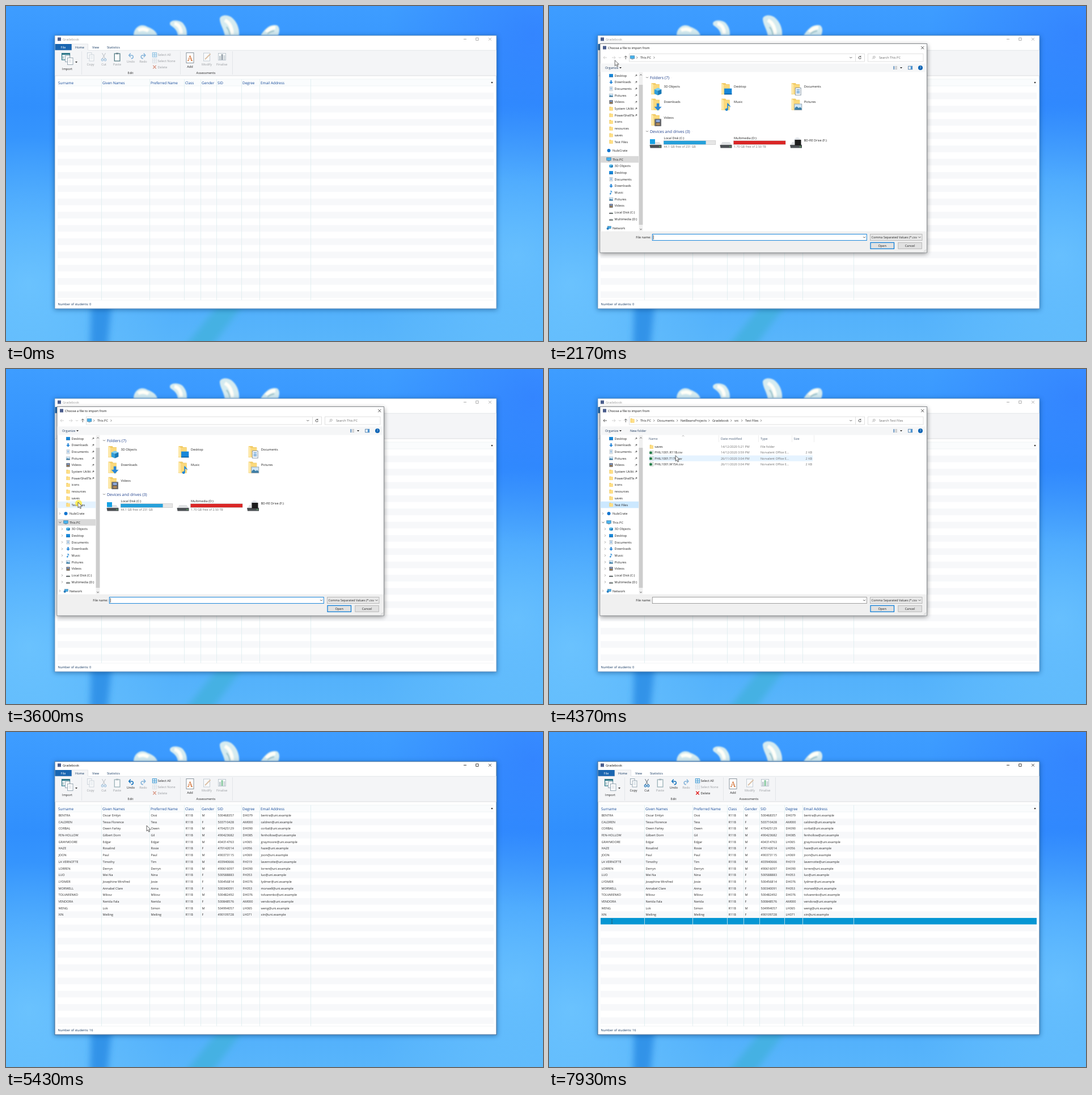
Recreate the animation shown at these times as an HTML page. Size 947 by 591 pixels, loop 7.99 s.

```html
<!DOCTYPE html>
<html lang="en">
<head>
<meta charset="utf-8">
<title>Gradebook import</title>
<style>
html,body{margin:0;width:100%;height:100%;overflow:hidden;background:#3b9bff}
svg{display:block;width:100vw;height:100vh}
text{font-family:"Open Sans","Noto Sans",sans-serif;text-rendering:geometricPrecision;white-space:pre}
</style>
</head>
<body>
<script>
const END = 7990, OPEN = 2090, FILES = 3740, CLOSE = 4730, FILL = 4775, SELECT = 7330;

// drawing helpers
const T = (x, y, s, c = '#222', z = 5.6, a = 'start') =>
  `<text x="${x}" y="${y + z * .36}" font-size="${z}" fill="${c}" text-anchor="${a}">${s}</text>`;
const R = (x, y, w, h, f, s = 'none', sw = .8) =>
  `<rect x="${x}" y="${y}" width="${w}" height="${h}" fill="${f}" stroke="${s}" stroke-width="${sw}"/>`;
const P = (d, s, w = .8, f = 'none') => `<path d="${d}" stroke="${s}" stroke-width="${w}" fill="${f}"/>`;
const F = (d, f) => `<path d="${d}" fill="${f}"/>`;
const C = (x, y, r, f) => `<circle cx="${x}" cy="${y}" r="${r}" fill="${f}"/>`;
const at = (x, y, s, k = 1) => `<g transform="translate(${x} ${y}) scale(${k})">${s}</g>`;
const fade = (o, s) => `<g opacity="${o}">${s}</g>`;
// content shown between two times
const G = (a, b, s) => `<g data-on="${a},${b}">${s}</g>`;
// a control that changes state once
const flip = (t, f) => G(0, t, f(false)) + G(t, END, f(true));
const right = (x, y, c = '#555') => P(`M${x - 1} ${y - 1.8}l1.8 1.8l-1.8 1.8`, c, .7);
const down = (x, y, c = '#444') => P(`M${x - 2} ${y - 1}l2 2l2 -2`, c, .8);
const drop = (x, y) => F(`M${x - 2} ${y - 1}h4l-2 2.2z`, '#222');

// icons on an 8 x 8 grid
const icon = {
  folder: F('M.6 .3h3l.8 1h3v6.4H.6z', '#f0c85a') + F('M1.6 1.3h5.8v6.4H1.6z', '#ffdf87'),
  desk: R(.2, 1, 7.6, 6, '#1787d9') + R(.2, 6.2, 7.6, .9, '#0b5d9e'),
  arrow: F('M2.7 .3h2.6v3.4h2.4L4 7.8L.3 3.7h2.4z', '#2a88d8'),
  doc: R(1.2, .4, 5.6, 7.2, '#fff', '#8a99a8', .6) + P('M2.3 2.2h3.4M2.3 3.8h3.4M2.3 5.4h3.4', '#4d8fcb', .8),
  pic: R(.3, 1, 7.4, 6, '#cfe6f7', '#8c9aa5', .5) + F('M.6 6.8V5l2-1.6 2 1.6 1.3-.8 1.6 1v1.6z', '#3d7ea6'),
  film: R(.7, .4, 6.6, 7.2, '#3c3f45') + R(2, 1, 4, 2.7, '#8ba6d8') + R(2, 4.3, 4, 2.7, '#a98659') +
    P('M1.3 .8v6.6M6.7 .8v6.6', '#ddd', .5).replace('/>', ' stroke-dasharray=".7 .7"/>'),
  cube: F('M4 .3l3.6 1.5L4 3.2L.4 1.8z', '#7fd0f5') + F('M.4 1.8L4 3.2v4.6L.4 6.2z', '#2f9fdc') + F('M7.6 1.8L4 3.2v4.6l3.6-1.6z', '#1878b5'),
  note: F('M3.2 .2h.9c.3 1.7 2.6 1.8 2.2 4.2c-.3-1.1-1.2-1.6-2.2-1.8v3.5c0 2.3-3 2.2-3 .5c0-1.1 1.2-1.5 2.1-1.2z', '#1d86d6'),
  drive: F('M1.5 3h5l1.3 2H.2z', '#d9dbdd') + R(.2, 5, 7.6, 1.9, '#55595d') + R(6.3, 5.6, .8, .7, '#62e066'),
  cloud: C(4, 4, 3, '#1274cf'),
  pc: R(.2, .8, 7.6, 5, '#46b3ee', '#3a6e92', .6) + R(2.2, 6.5, 3.6, .8, '#6f8799'),
  net: R(1.8, 1, 6, 4, '#48aee6', '#3a6e92', .5) + C(2.2, 5.2, 2.1, '#2a7fc0'),
  sheet: R(1.6, .4, 6, 7.2, '#fff', '#8d9a90', .5) + R(0, 2, 5, 4.6, '#1e7a45') + P('M5.5 2.6h1.5M5.5 4.2h1.5M5.5 5.8h1.5', '#7aa888', .6)
};
const I = (n, x, y, k = 1) => at(x - 4 * k, y - 4 * k, icon[n], k);

function wallpaper() {
  const petals = 'M225 52C225 38 238 29 250 37C258 40 265 44 267 52Z M290 34C284 24 308 22 314 33C319 40 319 46 319 52H303C302 42 297 39 290 34Z' +
    'M377 24C376 15 392 14 399 21C409 30 412 42 411 53H386C384 40 378 34 377 24Z M449 52C456 41 465 31 478 34C484 38 482 47 480 52Z';
  return R(0, 0, 947, 591, 'url(#sky)') + R(0, 0, 947, 591, 'url(#lo)') + R(0, 0, 947, 591, 'url(#ro)') + R(0, 0, 947, 591, 'url(#hi)') +
    `<g filter="url(#b6)">${F('M151 500h38L178 610h-30z', '#3193e8')}${F('M392 505h42L356 610h-48z', '#45b1e3')}</g>` +
    `<g filter="url(#b2)">${F(petals, '#d5ebf0')}${P('M233 43q9-5 18 1M297 31q11 2 12 18M386 25q12 6 13 25M459 46q7-8 16-8', '#fffff8', 6)}${P('M389 37q5 6 6 14M461 49q5-4 12-5', '#93bdc4', 2)}</g>`;
}

const people = [
  ['BENTRA', 'Oscar Emlyn', 'Ossi', 'M', '500468357', 'DH079'],
  ['CALDREN', 'Tessa Florence', 'Tess', 'F', '503710428', 'AM000'],
  ['CORBAL', 'Owen Farley', 'Owen', 'M', '470425129', 'DH090'],
  ['FEN-HOLLOW', 'Gilbert Dorn', 'Gil', 'M', '490423682', 'DH085'],
  ['GRAYMOORE', 'Edgar', 'Edgar', 'M', '404314763', 'LH065'],
  ['HAZE', 'Rosalind', 'Rosie', 'F', '470142014', 'LH056'],
  ['JOON', 'Paul', 'Paul', 'M', '490373115', 'LH069'],
  ['LA VERNOTTE', 'Timothy', 'Tim', 'M', '403940666', 'FH019'],
  ['LORREN', 'Derryn', 'Derryn', 'M', '490616097', 'DH090'],
  ['LUO', 'Mei Na', 'Nina', 'F', '500588883', 'FH053'],
  ['LYDMER', 'Josephine Winifred', 'Josie', 'F', '500456814', 'DH076'],
  ['MORWELL', 'Annabel Clare', 'Anna', 'F', '500340091', 'FH053'],
  ['TOLVARENKO', 'Milosz', 'Milosz', 'M', '500482492', 'DH076'],
  ['VENDORA', 'Nerida Fala', 'Nerida', 'F', '500848576', 'AM000'],
  ['WENG', 'Lok', 'Simon', 'M', '504994057', 'LH065'],
  ['XIN', 'Meiling', 'Meiling', 'F', '490109728', 'LH071']
];
const cols = [92, 170, 255, 316, 345, 373, 417, 449];
const ROW = 11.69, rowY = i => 141 + ROW * i;

function ribbon() {
  const ink = '#222', dim = '#9a9da1';
  const label = (x, y, s, on) => T(x, y, s, on ? ink : dim, 5.6, 'middle');
  const page = (x, y, w, h, s = '#8194a3') => R(x, y, w, h, '#fff', s, .8);
  const copy = page(143.5, 82.5, 7.5, 10) + page(147, 86, 8, 11) + P('M149 89h4M149 91h4M149 93h4', '#9eb5c7', .6);
  const cut = P('M169.5 83L175 93M175.5 83L170 93', '#5b6670', 1) +
    '<g fill="none" stroke="#1b72b8" stroke-width="1.2"><circle cx="170" cy="95" r="1.8"/><circle cx="175" cy="95" r="1.8"/></g>';
  const paste = R(191.3, 84, 9.6, 13, '#fff', '#426f79', 1.3) + R(194, 82.6, 4.2, 2.6, '#587781');
  const undo = P('M218 87h3.6c4 0 3.6 6-.9 5.6M219.7 83.6L216.7 87l3 3.2', '#1673bd', 1.5);
  const grid = c => R(258.3, 82.5, 7.4, 7.4, '#e4f2fb', c) + P('M258 86.2h8M262 82v8', c, .8);
  const cross = c => P('M259.3 104.8l5.4 5.6M264.7 104.8l-5.4 5.6', c, 1.4);
  return R(86.5, 78, 778, 45, '#f4f5f7') + P('M86 78.2H116M145 78.2H865', '#dcdfe2', .7) + P('M86 123H865', '#d3d6d9', .8) +
    P('M133.5 80v41M307.5 80v41M399.5 80v41', '#dfe2e5', .8) +
    G(830, OPEN, R(92.5, 80.5, 37, 38, '#d5e6f7', '#a5c8ea')) +
    R(98.5, 83.5, 14, 11.5, '#e9f4f5', '#2a7586', 1.2) + R(98.5, 83, 14, 3, '#2a7586') + T(100, 90.5, 'I', '#234', 6) +
    page(104.5, 87.5, 8, 11) + page(108.5, 91.5, 9.5, 12) + P('M110.5 95h5M110.5 97h5M110.5 99h5', '#b5c2cb', .6) + drop(124, 99) +
    label(108, 111, 'Import', 1) +
    flip(SELECT, on => fade(on ? 1 : .4, copy + cut) + label(149, 103, 'Copy', on) + label(172.6, 102.5, 'Cut', on) +
      fade(on ? 1 : .55, cross(on ? '#e01b1b' : '#c4502e')) + T(267.5, 107.5, 'Delete', on ? ink : dim)) +
    flip(FILL, on => fade(on ? .5 : .9, paste) + fade(on ? 1 : .5, undo) + label(220, 98, 'Undo', on) +
      fade(on ? 1 : .6, grid('#2288c8')) + T(267.5, 86, 'Select All', on ? ink : dim)) +
    label(196, 102.5, 'Paste') + fade(.5, `<g transform="translate(462.5 0) scale(-1 1)">${undo}</g>`) + label(242, 98, 'Redo') +
    fade(.25, at(0, 10.6, grid('#8495a0'))) + T(267.5, 97, 'Select None', dim) +
    page(318, 82.5, 13, 18, '#6e7b85') +
    '<text x="324.5" y="96.6" font-size="13.5" fill="#d06a2c" text-anchor="middle" style="font-family:\'Noto Serif\',serif">A</text>' + label(324.5, 106.5, 'Add', 1) +
    fade(.5, page(348.5, 83, 11, 14) + P('M351 94l9.5-9.5', '#c28a55', 1.8)) + label(354, 102.5, 'Modify') +
    flip(FILL, on => fade(.6, page(374.5, 83.5, 13, 12) + R(376, 88, 2.5, 7, '#9aa9b3') + R(379.6, 85, 3, 10, on ? '#43ad68' : '#5d6f7c') + R(383.8, 87, 2.5, 8, '#b1bdc5'))) +
    label(380.7, 102.5, 'Finalise') + label(219.5, 118, 'Edit', 1) + label(352.5, 118, 'Assessments', 1);
}

function table() {
  let s = R(91, 129, 769, 12, '#fafcfd') + P('M91 141H860M91 129H860', '#e9eff3', .7);
  for (let i = 1; rowY(i) < 515; i += 2) s += R(91, rowY(i), 769, ROW, '#f7f8fa');
  s += G(SELECT, END, R(91, rowY(16), 769, 11.4, '#0596d3'));
  s += P([168.5, 253.5, 314.5, 343.5, 371.5, 415.5, 447.5, 537.5].map(x => `M${x} 129V519`).join(''), '#dcecef', .8) + P('M91 519H860', '#eef0f2', .7);
  ['Surname', 'Given Names', 'Preferred Name', 'Class', 'Gender', 'SID', 'Degree', 'Email Address']
    .forEach((h, i) => s += T(cols[i], 135.3, h, '#0f4596', 6.4));
  const rows = people.map(([sur, given, pref, sex, sid, deg], i) =>
    [sur, given, pref, 'R11B', sex, sid, deg, sur.toLowerCase().replace(/[^a-z]/g, '') + '@uni.example']
      .map((v, k) => T(cols[k] + .5, 147 + ROW * i, v, '#2a2a2a', 5.5)).join('')).join('');
  return s + G(FILL, END, rows) + C(857, 135, 1.3, '#333') +
    flip(FILL, on => T(91.5, 525.7, 'Number of students: ' + (on ? 16 : 0), '#173a63'));
}

function mainWindow() {
  const bar = c => T(100, 59, 'Gradebook', c) + P('M807 58.5h5M828.7 56.2h4.4v4.4h-4.4zM851.2 56.2l4.6 4.6M855.8 56.2l-4.6 4.6', c, .8);
  const dim = bar('#999'), lit = bar('#111') + R(86, 52, 779, 482, 'none', '#44719c', .8);
  return `<g filter="url(#b4)" opacity=".5">${R(85, 53, 781, 483, '#0a3a70')}</g>` +
    R(86, 52, 779, 482, '#fff', '#5f8db8') + R(91, 55.5, 6, 6, '#4a5d8c') +
    G(0, 1810, dim) + G(1810, 1950, lit) + G(1950, CLOSE, dim) + G(CLOSE, END, lit) +
    R(86.5, 67, 29.5, 11.4, '#1965b0') + T(101, 72.7, 'File', '#fff', 5.6, 'middle') + ribbon() +
    F('M116 79V67h29v12z', '#f4f5f7') + P('M116 78V67h28.5v11', '#dcdfe2', .7) +
    T(122, 72.7, 'Home', '#173a63') + T(152, 72.7, 'View', '#173a63') + T(178, 72.7, 'Statistics', '#173a63') + table() +
    G(1350, 1810, R(113.7, 97, 74.6, 13.4, '#2c2d2f') + T(118, 103.7, 'Import students from class roll', '#f2f2f2', 4.7));
}

function sidebar() {
  const quick = [['Desktop', 'desk'], ['Downloads', 'arrow'], ['Documents', 'doc'], ['Pictures', 'pic'], ['Videos', 'film'],
    ['System Utiliti', 'folder'], ['PowerShellTe', 'folder'], ['icons', 'folder'], ['resources', 'folder'], ['saves', 'folder'], ['Test Files', 'folder']];
  const pc = [['3D Objects', 'cube'], ['Desktop', 'desk'], ['Documents', 'doc'], ['Downloads', 'arrow'], ['Music', 'note'],
    ['Pictures', 'pic'], ['Videos', 'film'], ['Local Disk (C:)', 'drive'], ['Multimedia (D:)', 'drive']];
  const roots = [['NubiCrate', 'cloud', 255], ['This PC', 'pc', 270.6], ['Network', 'net', 391.5]];
  let s = G(OPEN, FILES, R(90.5, 264.8, 67.5, 11.6, '#d9d9d9')) + G(FILES, CLOSE, R(90.5, 233.7, 67.5, 11.6, '#cce8ff')), open = '';
  quick.forEach(([n, k], i) => {
    const y = 122.6 + 11.69 * i;
    s += I(k, 109.5, y, .9) + T(115.6, y, n);
    if (i < 7) s += at(153.6, y, P('M-2 2L0 0', '#666', .6) + F('M-1.2-.6L.6-2.2L2.2-.4L.4 1.2z', '#777'));
  });
  pc.forEach(([n, k], i) => {
    const y = 282.2 + 11.7 * i;
    s += I(k, 109.5, y, .9) + T(115.6, y, n);
    open += right(99, y, '#777');
  });
  roots.forEach(([n, k, y], i) => {
    s += I(k, 105.5, y) + T(112, y, n);
    open += i == 1 ? down(95.3, y) : right(95, y, '#777');
  });
  return s + G(2960, CLOSE, open) + R(158.6, 117, 6.8, 280, '#f0f0f0') + R(158.6, 139, 6.8, 247, '#cdcdcd') +
    P('M160.3 122.4l1.7-1.7l1.7 1.7M160.3 393l1.7 1.7l1.7-1.7', '#444', .9);
}

function pcView() {
  const navy = '#1e3f8b';
  let s = down(173, 126, '#777') + T(178, 126.2, 'Folders (7)', navy, 7) + down(173, 221, '#777') + T(178, 221.2, 'Devices and drives (3)', navy, 7) +
    P('M216 126.3H217M252 221.3H253', '#e2e2e2', .6);
  [['3D Objects', 'cube'], ['Desktop', 'desk'], ['Documents', 'doc'], ['Downloads', 'arrow'], ['Music', 'note'], ['Pictures', 'pic'], ['Videos', 'film']]
    .forEach(([n, k], i) => {
      const x = 179.5 + 123.6 * (i % 3), y = 136 + 27.4 * (i / 3 | 0);
      s += F(`M${x + 1} ${y}h7l1.5 2h6v18h-14.5z`, '#f1cb67') + F(`M${x + 1} ${y}l4 3v17.5l-4-2z`, '#ffe9a8') + F(`M${x + 5} ${y + 3}h10.5v17H${x + 5}z`, '#fbd97c') +
        I(k, x + 12.6, y + 14.8, 1.75) + T(x + 23, y + 5.7, n);
    });
  const bar = (x, w, c) => R(x, 237.7, 91.5, 6.6, '#e6e6e6', '#bcbcbc', .6) + R(x, 237.9, w, 6.2, c);
  const disk = x => F(`M${x + 4} 240h13l4 5h-20z`, '#dfe1e3') + F(`M${x} 245h21v5.5h-20z`, '#4c5054') + R(x + 17, 247.4, 2, 1.2, '#57e25c');
  return s + disk(177.5) + R(178, 235, 9, 8.6, '#16a2e4') + T(202.5, 233, 'Local Disk (C:)') + bar(202.3, 74.3, '#26a0da') + T(202.5, 248, '44.1 GB free of 231 GB', '#6d6d6d', 5.35) +
    disk(301.5) + T(326, 233, 'Multimedia (D:)') + bar(325.6, 91.4, '#da2626') + T(326, 248, '1.70 GB free of 2.50 TB', '#6d6d6d', 5.35) +
    C(438, 238, 6, '#dfe3e8') + disk(425) + R(433.5, 236, 11, 10, '#1c1c1c') + T(449.5, 236.7, 'BD-RE Drive (F:)');
}

function fileView() {
  const head = '#4c607a', soft = '#6d6d6d';
  let s = P('M299.5 117v12M369.5 117v12M428.5 117v12M467.5 117v12', '#e5e5e5', .7) + P('M234.8 118.8l1.8-1.5l1.8 1.5', '#777', .6);
  [[176, 'Name'], [303, 'Date modified'], [373, 'Type'], [431.5, 'Size']].forEach(([x, n]) => s += T(x, 123.3, n, head));
  [['saves', '14/12/2020 5:21 PM'], ['PHIL1001.R11B.csv', '14/12/2020 3:59 PM'], ['PHIL1001.T17B.csv', '26/11/2020 3:04 PM'], ['PHIL1001.W15A.csv', '26/11/2020 3:04 PM']]
    .forEach(([n, d], i) => {
      const y = 137.2 + 10.25 * i;
      s += I(i ? 'sheet' : 'folder', 180.8, y, .9) + T(186.3, y, n) + T(303, y, d, soft, 5.45) +
        T(373, y, i ? 'Norvalent Office E...' : 'File folder', soft, 5.45) + (i ? T(464, y, '2 KB', soft, 5.45, 'end') : '');
    });
  return s;
}

function dialog() {
  const crumbs = list => list.map(([x, n]) => right(x - 5.7, 91) + T(x, 91, n)).join('');
  const arrow = (x, d, c) => P(`M${x - 3 * d} 91h${6 * d}M${x - .6 * d} 88.5l${-2.5 * d} 2.5l${2.5 * d} 2.5`, c, .8);
  const search = n => T(582, 91, 'Search ' + n, '#6d6d6d');
  const pc = arrow(99, 1, '#c4c4c4') + I('pc', 147, 91) + crumbs([[161, 'This PC']]) + right(185.5, 91) + search('This PC') + pcView() +
    R(182.3, 402.6, 378, 11, 'none', '#0078d7', .9);
  const files = arrow(99, 1, '#333') + I('folder', 147, 91) +
    crumbs([[161, 'This PC'], [191, 'Documents'], [232, 'NetBeansProjects'], [288, 'Gradebook'], [327, 'src'], [346, 'Test Files']]) + right(374, 91) +
    search('Test Files') + T(143, 109, 'New folder', '#1f3a5f') + fileView() + R(182.3, 402.6, 378, 11, 'none', '#8a8a8a', .8);
  const button = (x, n, c, w) => R(x, 417.3, 41.5, 11, '#e1e1e1', c, w) + T(x + 20.7, 422.7, n, '#222', 5.6, 'middle');
  return `<g filter="url(#b4)" opacity=".45">${R(90, 69, 577, 368, '#000')}</g>` +
    R(90, 66.5, 576.5, 368.5, '#fff', '#6b7075') + R(95, 70.5, 6, 6, '#4a5d8c') + T(104, 74, 'Choose a file to import from', '#111') +
    P('M656.2 71.2l5 5M661.2 71.2l-5 5', '#222', .8) +
    arrow(114, -1, '#c4c4c4') + down(125, 91, '#c0c0c0') + P('M135.3 94v-6M132.8 90.5l2.5-2.5l2.5 2.5', '#444', .8) +
    R(141.5, 84.2, 415, 13.8, '#fff', '#d9d9d9') + P('M540.5 84v14', '#d9d9d9') + down(532.3, 91) +
    P('M549.6 89.4a2.2 2.2 0 1 0 .7 1.8M549.9 87.8v1.9h-1.9', '#333', .8) +
    R(562.3, 84.2, 97.7, 13.8, '#fff', '#d9d9d9') + P('M570 93.5l1.8-1.8M571.5 90.3a1.8 1.8 0 1 1 1.8 1.8a1.8 1.8 0 0 1-1.8-1.8', '#888', .7) +
    R(90.5, 101.5, 575.6, 15, '#f5f6f7') + T(99, 109, 'Organize', '#1f3a5f') + drop(126, 109) +
    P('M607 106.8h2.5M607 109h2.5M607 111.2h2.5', '#4b81b5', 1.3) + P('M610.5 106.8h3.5M610.5 109h3.5M610.5 111.2h3.5', '#888', .7) + drop(621, 109) +
    R(633.7, 106.2, 7, 5.6, '#fff', '#336b9f', .8) + R(637.7, 106.2, 3, 5.6, '#4b93d2') + C(655, 109, 4, '#0a63b5') + T(655, 109.2, '?', '#fff', 6, 'middle') +
    R(90.5, 397.5, 575.6, 37, '#f0f0f0') + R(182.3, 402.6, 378, 11, '#fff') + '<rect id="hover" fill="#e5f3ff"/>' +
    sidebar() + G(OPEN, FILES, pc) + G(FILES, END, files) +
    '<rect id="caret" x="183.8" y="404.3" width=".7" height="7.6" fill="#111"/>' +
    down(556, 408) + T(180, 408, 'File name:', '#222', 5.6, 'end') + R(566.5, 402.6, 91.5, 11, '#e8e8e8', '#adadad') +
    T(568.5, 408, 'Comma Separated Values (*.csv', '#222', 5.45) + down(653.5, 408) +
    button(567, 'Open', '#0078d7', 1.2) + button(615.8, 'Cancel', '#adadad', .8) + P('M661 433.5l4-4M663.4 433.5l1.6-1.6', '#b5b5b5', .7);
}

const glow = (id, x, y, r, c, o) => `<radialGradient id="${id}" gradientUnits="userSpaceOnUse" cx="${x}" cy="${y}" r="${r}"><stop stop-color="${c}" stop-opacity="${o}"/><stop offset="1" stop-color="${c}" stop-opacity="0"/></radialGradient>`;
const blur = n => `<filter id="b${n}" x="-20%" y="-20%" width="140%" height="140%"><feGaussianBlur stdDeviation="${n == 2 ? 1.2 : n}"/></filter>`;
document.body.innerHTML = `<svg viewBox="0 0 947 591" preserveAspectRatio="none"><defs>
<linearGradient id="sky" x2="0" y2="1"><stop stop-color="#3e9dff"/><stop offset=".3" stop-color="#308ffd"/><stop offset=".65" stop-color="#45a5fd"/><stop offset="1" stop-color="#58b5fb"/></linearGradient>
${glow('lo', 40, 490, 260, '#76cbff', .7)}${glow('ro', 900, 440, 270, '#76cbff', .65)}${glow('hi', 930, 50, 260, '#2f78ff', .6)}${[2, 4, 6].map(blur).join('')}</defs>
${wallpaper()}${mainWindow()}<g id="dlg">${dialog()}</g>
<circle id="click" r="6" fill="#ffe92e" opacity=".75"/>
<g id="arrow">${P('M0 0V9.8L2.3 7.7L3.8 11.2L5.5 10.5L4 7.1H7Z', '#222', .7, '#fff')}</g>
<g id="beam">${P('M109.6 330.5h2.8M111 330.5v7M109.6 337.5h2.8', '#27576b', .8)}</g></svg>`;

// pointer stops: time, x, y
const path = [[130, 872, 569], [890, 109, 92.5], [2090, 109, 92.5], [2520, 197, 147], [2880, 172, 212], [3330, 127, 235], [3700, 127, 235],
  [4370, 223, 152.8], [4420, 219, 150], [4510, 215, 147], [4730, 215, 147], [5430, 248, 165], [5700, 271, 158], [5960, 210, 232],
  [6340, 84, 200], [6480, 110, 182], [6740, 238, 205], [7100, 107, 330], [END, 107, 330]];

function pointer(t) {
  let i = 0;
  while (i < path.length - 2 && t >= path[i + 1][0]) i++;
  const a = path[i], b = path[i + 1], d = b[0] - a[0], u = Math.min(1, Math.max(0, (t - a[0]) / d));
  const slope = (n, k) => {
    const p = path[n - 1], c = path[n], q = path[n + 1];
    const rest = !p || !q || (p[1] == c[1] && p[2] == c[2]) || (q[1] == c[1] && q[2] == c[2]);
    return rest ? 0 : (q[k] - p[k]) / (q[0] - p[0]) * d;
  };
  return [1, 2].map(k => a[k] * (1 - u) ** 2 * (1 + 2 * u) + slope(i, k) * u * (1 - u) ** 2 +
    b[k] * u * u * (3 - 2 * u) - slope(i + 1, k) * u * u * (1 - u));
}

const clicks = [[1810, 1900], [3600, 3700], [4465, 4510], [7290, 7380], [7470, 7560]];
// hover zones: from, to, x, y, width, row pitch, row height, rows
const zones = [[OPEN, FILES, 175, 133.5, 121, 27.4, 25, 3], [OPEN, FILES, 90.5, 116.8, 67.5, 11.69, 11.6, 11], [FILES, CLOSE, 176, 132, 289, 10.25, 10.2, 4]];
const el = id => document.getElementById(id);
const show = (e, on) => e.style.display = on ? '' : 'none';
const timed = [...document.querySelectorAll('[data-on]')].map(e => [e, ...e.dataset.on.split(',').map(Number)]);
const dlg = el('dlg'), hover = el('hover'), caret = el('caret'), click = el('click'), arrow = el('arrow'), beam = el('beam');

function draw(t) {
  for (const [e, a, b] of timed) show(e, t >= a && t < b);
  const [x, y] = pointer(t);
  show(dlg, t >= OPEN && t < CLOSE);
  dlg.setAttribute('opacity', Math.min(1, .4 + (t - OPEN) / 130));
  show(caret, t >= 2130 && t < FILES && (t - 2130) % 1060 < 530);
  const z = zones.find(([a, b, zx, zy, w, p, h, n]) => t >= a && t < b && x >= zx && x < zx + w && y >= zy && y < zy + p * n);
  show(hover, z);
  if (z) {
    const [, , zx, zy, w, p, h] = z;
    Object.entries({x: zx, y: zy + p * Math.floor((y - zy) / p), width: w, height: h}).forEach(([k, v]) => hover.setAttribute(k, v));
  }
  show(click, clicks.some(([a, b]) => t >= a && t < b));
  click.setAttribute('transform', `translate(${x + 1} ${y + 2})`);
  show(arrow, t >= 130 && t < 7890);
  arrow.setAttribute('transform', `translate(${x} ${y})`);
  show(beam, t >= 7890);
}

const start = performance.now();
function tick() {
  draw((performance.now() - start) % END);
  requestAnimationFrame(tick);
}
tick();
</script>
</body>
</html>
```
